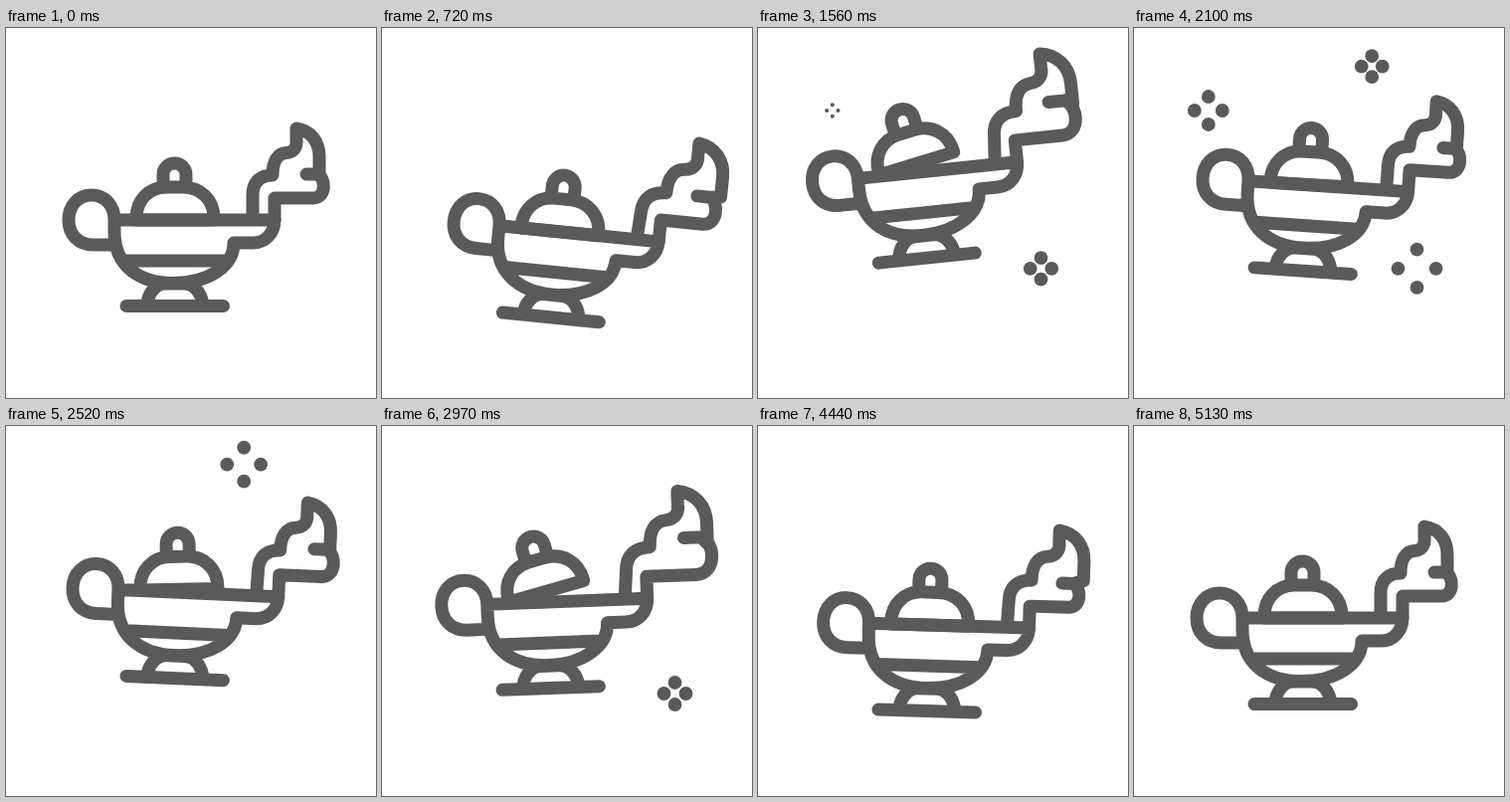
An HTML page with a canvas for the animation above (5.4 s loop, 372 by 372 pixels).

```html
<!DOCTYPE html>
<html lang="en">
<head>
<meta charset="utf-8">
<title>Magic lamp</title>
<style>
html, body { margin: 0; width: 100%; height: 100%; overflow: hidden; background: #fff; }
canvas { display: block; }
</style>
</head>
<body>
<canvas id="stage" width="372" height="372"></canvas>
<script>
const ctx = document.getElementById('stage').getContext('2d');
const INK = '#5a5a5a', LOOP = 5400, STEP = 30;

// All parts swing on the same beats: rest, crouch, leap, three fading sways, rest.
const BEATS = [150, 800, 1300, 2200, 3270, 4180, 5130];

// Eases through one value per beat, at rest on every extreme.
function swing(...values) {
  const last = values.length - 1;
  const slope = i => (values[i + 1] - values[i]) / (BEATS[i + 1] - BEATS[i]);
  const speed = i => {
    if (i === 0 || i === last) return 0;
    const a = slope(i - 1), b = slope(i);
    return a * b > 0 ? 2 * a * b / (a + b) : 0;
  };
  return t => {
    if (t <= BEATS[0]) return values[0];
    if (t >= BEATS[last]) return values[last];
    const i = BEATS.findIndex(b => b > t) - 1;
    const span = BEATS[i + 1] - BEATS[i], u = (t - BEATS[i]) / span, w = 1 - u;
    return values[i] * w * w * (1 + 2 * u) + values[i + 1] * u * u * (1 + 2 * w)
      + span * u * w * (speed(i) * w - speed(i + 1) * u);
  };
}

const LIFT_LAG = 60;
const lift = swing(0, 13, -50, -31.5, -8.5, 8, 0);
const tilt = swing(0, 6, -8.5, 4.3, -3.7, 2.1, 0);
const lidAngle = swing(0, 0, -14, 0, -17, 0, 0);
const plume = swing(0, 0.7, 1.04, 0, 1.08, 0.6, 0);
const puff = swing(0, 0.3, 0.9, 0, 1.12, 0, 0);

const sparkles = [
  { x: 284.5, y: 241.8, start: 1185 },
  { x: 74.8, y: 83, start: 1516 },
  { x: 239.2, y: 38.7, start: 1743 },
  { x: 294.5, y: 269, start: 2580 }
];

const body = new Path2D(`
  M109 218H88C73 218 63 208 63 193C63 178 73 168 86 168C99 168 109 178 109 193
  H270C270 206 261 216 248 216H229C229 240 203 256.5 168 256.5C135 256.5 109 240 109 205V193
  M119 234H221
  M142 279C142 268 150 257 160 257H179C190 257 197 268 198 279
  M121 279.5H218.5`);

const lid = new Path2D(`
  M131 193V191C131 173 144 160 161 160H178C196 160 209 173 209 191V193Z
  M158 157V147.5A11.5 11.5 0 0 1 181 147.5V157`);

function rotateAbout(x, y, degrees) {
  ctx.translate(x, y);
  ctx.rotate(degrees * Math.PI / 180);
  ctx.translate(-x, -y);
}

// Places points stretched away from a fixed centre.
const stretch = (cx, cy, sx, sy) => (x, y) =>
  `${cx + (x - cx) * (1 + sx)} ${cy + (y - cy) * (1 + sy)} `;

function smokePath(u, v) {
  const high = stretch(240, 185, 0.27 * u, 0.2 * u);
  const low = stretch(290, 171, 0.65 * v, 0.62 * v);
  return new Path2D(
    'M248 187L' + high(248, 168) +
    'C' + high(248, 154) + high(256, 148) + high(268, 148) +
    'C' + high(268, 134) + high(273, 126) + high(282, 125.5) +
    'C' + high(289, 125) + high(293, 120) + high(292, 112) +
    'L' + high(292, 101) +
    'C' + high(306, 103) + high(315, 114) + high(315, 129) +
    'L' + high(315, 147) + 'L' + low(313, 147) +
    'M' + low(302, 147) + 'L' + low(313, 147) +
    'C' + low(322, 151) + low(322, 171) + low(309, 171) +
    'L270 171V193');
}

function drawSparkle({ x, y, start }, t) {
  const age = t - start, life = 980;
  if (age < 0 || age >= life) return;
  const reach = Math.min(19.2, 5 + age * 0.0154);
  const size = 6.9 * Math.min(1, age / 150, (life - age) / 60);
  for (let i = 0; i < 4; i++) {
    const a = i * Math.PI / 2;
    ctx.beginPath();
    ctx.arc(x + reach * Math.cos(a), y + reach * Math.sin(a), size, 0, Math.PI * 2);
    ctx.fill();
  }
}

function draw(t) {
  ctx.fillStyle = '#fff';
  ctx.fillRect(0, 0, 372, 372);
  ctx.fillStyle = ctx.strokeStyle = INK;
  ctx.lineWidth = 13;
  ctx.lineCap = ctx.lineJoin = 'round';

  ctx.save();
  ctx.translate(0, lift(t - LIFT_LAG));
  rotateAbout(170, 279.5, tilt(t));
  ctx.stroke(body);
  ctx.stroke(smokePath(plume(t), puff(t)));
  const opening = lidAngle(t);
  ctx.translate(0, opening * 0.12);
  rotateAbout(131, 193, opening);
  ctx.stroke(lid);
  ctx.restore();

  sparkles.forEach(s => drawSparkle(s, t));
}

const begin = performance.now();
function frame() {
  const t = (performance.now() - begin) % LOOP;
  draw(Math.floor(t / STEP) * STEP);
  requestAnimationFrame(frame);
}
frame();
</script>
</body>
</html>
```
